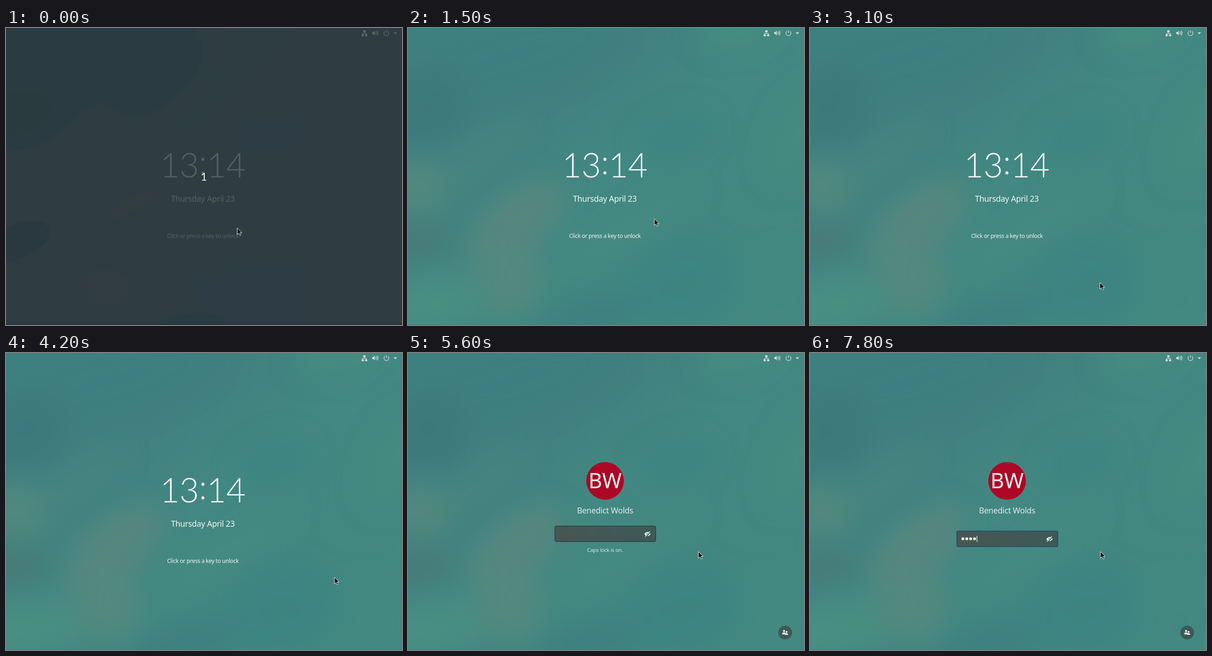
Recreate the animation shown at these times as an HTML page. Size 864 by 648 pixels, loop 8 s.

```html
<!DOCTYPE html>
<html lang="en">
<head>
<meta charset="utf-8">
<title>Unlock screen</title>
<style>
  html, body { margin: 0; width: 100%; height: 100%; overflow: hidden; background: #42857f; }
  svg { display: block; width: 864px; height: 648px; }
  text { font-family: "Noto Sans", "Open Sans", sans-serif; fill: #f4f6f5; }
  .mid { text-anchor: middle; }
  .clock, .count { font-family: Lato, "Noto Sans", sans-serif; }
  .clock { font-size: 74px; font-weight: 300; letter-spacing: -.6px; }
  .count { font-size: 24px; }
  .date, .name { font-size: 17.6px; letter-spacing: -.33px; }
  .hint { font-size: 12.3px; letter-spacing: -.32px; }
  .caps { font-size: 11.6px; letter-spacing: -.33px; fill: #dce5e3; }
  .name { fill: #dfe8e6; }
  .initials { font-size: 46px; }
  .empty { font-size: 11.8px; fill: #a3aeac; }
</style>
</head>
<body>
<svg viewBox="0 0 864 648">
  <defs>
    <linearGradient id="base" x1="0" y1="0" x2="1" y2="1">
      <stop offset="0" stop-color="#3e8180"/>
      <stop offset=".3" stop-color="#40817f"/>
      <stop offset=".5" stop-color="#438882"/>
      <stop offset=".72" stop-color="#428780"/>
      <stop offset="1" stop-color="#438b82"/>
    </linearGradient>
    <linearGradient id="field">
      <stop offset="0" stop-color="#475653"/>
      <stop offset="1" stop-color="#3e5a57"/>
    </linearGradient>
    <filter id="soft" x="-50%" y="-50%" width="200%" height="200%">
      <feGaussianBlur stdDeviation="27"/>
    </filter>
    <filter id="edge" x="-20%" y="-20%" width="140%" height="140%">
      <feGaussianBlur stdDeviation="1.5"/>
    </filter>
    <clipPath id="stage"><rect width="864" height="648"/></clipPath>
  </defs>

  <g clip-path="url(#stage)">
    <rect width="864" height="648" fill="url(#base)"/>
    <g id="blobs" filter="url(#soft)"></g>
    <rect y="647" width="864" height="1" fill="#4e6f74" opacity=".6"/>
  </g>

  <g id="night">
    <rect width="864" height="648" fill="#2f3d42"/>
    <g filter="url(#edge)">
      <path d="M0 0H412Q430 30 428 65C420 105 380 145 350 168C320 192 270 195 245 180C200 150 165 178 135 212C95 255 50 268 0 268Z" fill="#2b3b43"/>
      <path d="M0 136C55 130 100 142 101 172C100 210 50 240 0 238Z" fill="#2b3a41"/>
      <path d="M0 433C45 416 92 414 95 442C92 480 45 503 0 512Z" fill="#2c393f"/>
      <path d="M500 215C540 190 635 195 638 222C635 265 570 285 520 270Z" fill="#2d3d44"/>
      <path d="M480 0H640L470 160L350 250C400 190 480 100 480 0Z" fill="#2e3d43"/>
      <path d="M230 418C235 385 270 362 325 358C310 390 265 405 230 418Z" fill="#323c41"/>
      <path d="M178 540C200 515 265 535 270 565C265 600 215 615 180 600Z" fill="#303c43"/>
      <path d="M400 575C450 540 500 520 560 515H652V648H470Z" fill="#2d3d44"/>
      <path d="M325 648C350 620 455 612 475 632L480 648Z" fill="#2b3b43"/>
    </g>
    <rect y="644" width="864" height="4" fill="#2f3340"/>
  </g>

  <g id="tray" fill="#d3dedc" stroke="#d3dedc" stroke-width="0">
    <path d="M779.500 5h5v4.500h-2v2h4.500v2.500h1v4h-4.500v-4h2.300v-1.300h-7.600v1.300h2.300v4h-4.500v-4h1v-2.500h4.500v-2h-2z"/>
    <path d="M799 9h2.300l3.200-3.300v10.600l-3.200-3.300h-2.300z"/>
    <path d="M806.300 8.700q1.800 2.300 0 4.600M808.200 7q3.200 4 0 8M810 5.500q4 5.500 0 11" fill="none" stroke-width="1.100"/>
    <path d="M826.700 6.900a5.400 5.400 0 1 0 6.600 0M830 4.800v6" fill="none" stroke-width="1.300"/>
    <path d="M845.500 9.500h8l-4 4z"/>
  </g>

  <g id="lock">
    <text class="clock" x="336" y="326">13<tspan dy="-7">:</tspan><tspan dy="7">14</tspan></text>
    <text class="date mid" x="429.500" y="379">Thursday April 23</text>
    <text class="hint mid" x="429.600" y="457.500">Click or press a key to unlock</text>
  </g>

  <g id="login">
    <circle cx="430" cy="279" r="41" fill="#ae0725"/>
    <text class="initials mid" x="430" y="295">BW</text>
    <text class="name mid" x="430" y="350">Benedict Wolds</text>
    <g id="entry">
      <rect id="box" x="320.500" y="377.500" width="220" height="34" rx="3" fill="url(#field)"/>
      <g transform="translate(522.500 395)">
        <path d="M-7 0Q0-9 7 0Q0 9-7 0Z" fill="#eef2f1"/>
        <circle r="2.300" fill="#3f5957"/>
        <path d="M-4.500 6.500L6-5" stroke="#3f5957" stroke-width="3.400"/>
        <path d="M-5 5.500L5-5.500" stroke="#eef2f1" stroke-width="1.700"/>
      </g>
      <text id="empty" class="empty" x="331" y="399.500">Password</text>
      <g id="dots" fill="#f2f5f4"></g>
      <rect id="caret" y="388" width="1.200" height="13" fill="#fff"/>
    </g>
    <text id="caps" class="caps mid" x="429.800" y="434">Caps lock is on.</text>
    <circle cx="823" cy="610" r="15" fill="#3b5957"/>
    <g fill="#eef2f1">
      <circle cx="820.500" cy="606.500" r="2.200"/>
      <path d="M816.500 614v-1.500q0-3 4-3q3 0 3.200 2v2.500z"/>
      <circle cx="826" cy="608.500" r="2"/>
      <path d="M822.800 615v-1q0-2.800 3.200-2.800q3.300 0 3.300 2.800v1z"/>
    </g>
  </g>

  <text id="count" class="count mid" x="431.700" y="333">1</text>
  <path id="cursor" d="M.5.5V14.800L3.900 11.500L6.300 16.500L8.800 15.400L6.500 10.600H11Z" fill="#080808" stroke="#f4f4f4" stroke-width="1" stroke-linejoin="round"/>
</svg>

<script>
const LOOP = 8000;
const $ = id => document.getElementById(id);
const NS = "http://www.w3.org/2000/svg";

function add(parent, tag, attrs) {
  const el = document.createElementNS(NS, tag);
  for (const key in attrs) el.setAttribute(key, attrs[key]);
  return parent.appendChild(el);
}

// cx, cy, rx, ry, tilt, colour
[
  [230, 60, 230, 80, -15, "#3e7f80"],
  [40, 170, 95, 85, -30, "#3c797b"],
  [720, 0, 90, 45, -15, "#448c80"],
  [850, 230, 55, 120, 25, "#448a80"],
  [585, 235, 85, 45, -20, "#3e8480"],
  [30, 345, 75, 60, 5, "#51887f"],
  [150, 290, 130, 30, -35, "#488480"],
  [235, 425, 125, 60, -40, "#56867f"],
  [220, 545, 75, 80, -20, "#53887f"],
  [25, 465, 80, 42, -15, "#477b78"],
  [45, 605, 120, 60, -10, "#4a8e83"],
  [480, 440, 180, 28, -32, "#458b82"],
  [600, 560, 120, 100, -20, "#3e8481"],
  [395, 635, 120, 45, -15, "#3e807f"],
  [805, 590, 90, 95, 0, "#428881"]
].forEach(([cx, cy, rx, ry, tilt, fill]) =>
  add($("blobs"), "ellipse", { cx, cy, rx, ry, fill, transform: `rotate(${tilt} ${cx} ${cy})` }));

const dots = Array.from({ length: 4 }, (_, i) =>
  add($("dots"), "circle", { cx: 333.5 + i * 8.5, cy: 394.3, r: 3.1 }));

// time, x, y of the pointer tip; no place means out of sight
const path = [
  [0, 504, 436], [200, 503, 437], [800, 504, 440], [900, 514, 433],
  [1000, 526, 425], [1100, 534, 419], [1500, 537, 416], [1600, 536, 416],
  [1700, 535, 415], [1900, 534, 415], [2400, 560, 450], [2500, 610, 525],
  [2600, 637, 564], [2800, 633, 561], [3100, 632, 555], [4200, 716, 489],
  [4300], [5000, 673, 429], [5100, 633, 433]
];
const keys = [6800, 7000, 7600, 7800];

const show = (id, on) => { $(id).style.display = on ? "" : "none"; };

function draw(t) {
  const dark = t < 200, login = t >= 5600, focus = t >= 5700;
  const typed = keys.filter(k => t >= k).length;
  const [, x, y] = path.filter(p => t >= p[0]).pop();

  show("night", dark);
  show("count", dark);
  $("lock").style.opacity = dark ? .18 : 1;
  $("tray").style.opacity = dark ? .28 : 1;
  show("lock", !login);
  show("login", login);

  show("caps", !focus);
  show("empty", focus && !typed);
  show("caret", focus);
  $("entry").setAttribute("transform", `translate(0 ${focus ? 11 : 0})`);
  $("box").setAttribute("stroke", focus ? "#184777" : "#202c2b");
  $("box").setAttribute("stroke-width", focus ? 1.6 : 1);
  dots.forEach((d, i) => { d.style.display = i < typed ? "" : "none"; });
  $("caret").setAttribute("x", typed ? 329.7 + typed * 8.5 : 329.5);

  show("cursor", x !== undefined);
  if (x !== undefined) $("cursor").setAttribute("transform", `translate(${x} ${y})`);
}

const start = performance.now();
function tick() {
  draw((performance.now() - start) % LOOP);
  requestAnimationFrame(tick);
}
tick();
</script>
</body>
</html>
```
